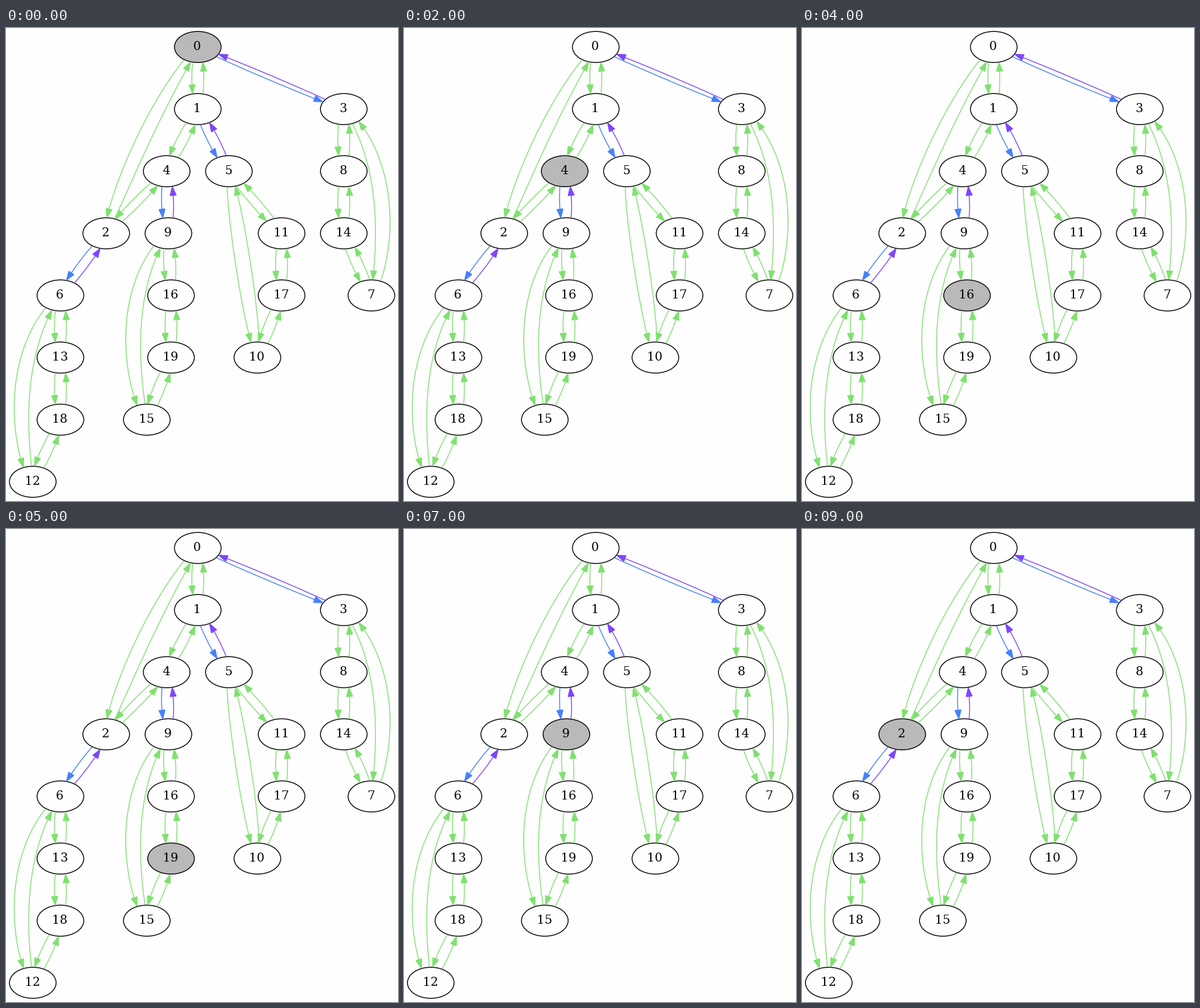
These frames come from a looping animation (605x731 px, 10 s). A matplotlib script:

```python
import numpy as np
import matplotlib.pyplot as plt
from matplotlib.animation import FuncAnimation
from matplotlib.patches import Ellipse, Polygon

W, H, DPI = 605, 731, 64
PT = 72 / DPI  # points per pixel
LINE = 4 / 3 * PT
RX, RY, ROW = 36, 24, 96
GREEN, BLUE, PURPLE = "#80e070", "#4680fa", "#7d46fa"
PAPER, VISITED = "#fefefe", "#b9b9b9"
HEAD_LEN, HEAD_HALF, DIGIT = 13.33, 4.67, 12

# x of every node, one dict per row
ROWS = [
    {0: 296},
    {1: 296, 3: 521.33},
    {4: 248, 5: 344, 8: 521.33},
    {2: 154.67, 9: 250.67, 11: 425.33, 14: 521.33},
    {6: 84, 16: 254.67, 17: 425.33, 7: 564},
    {13: 84, 19: 254.67, 10: 388},
    {18: 84, 15: 217.33},
    {12: 41.33},
]
NODES = {n: np.array([x, RY + 5.33 + ROW * r])
         for r, row in enumerate(ROWS) for n, x in row.items()}

# each ring of nodes, with the sideways bend of its closing link
RINGS = [((0, 1, 4, 2), -14), ((3, 8, 14, 7), 37), ((5, 11, 17, 10), 0),
         ((9, 16, 19, 15), -37), ((6, 13, 18, 12), -37)]
BRIDGES = [(0, 3), (1, 5), (4, 9), (2, 6)]
WALK = [0, 1, 4, 9, 16, 19, 15, 9, 4, 2]


def outside(points, center):
    x, y = (points - center).T
    return (x / (RX + 0.5))**2 + (y / (RY + 0.5))**2 > 1


def draw_arrow(ax, curve, color):
    tip = curve[-1]
    shaft = curve[np.hypot(*(curve - tip).T) >= HEAD_LEN]
    base = shaft[-1]
    along = (tip - base) / np.hypot(*(tip - base))
    side = HEAD_HALF * np.array([-along[1], along[0]])
    ax.plot(*shaft.T, color=color, lw=LINE, solid_capstyle="butt", snap=False)
    ax.add_patch(Polygon([base + side, tip, base - side], facecolor=color,
                         edgecolor=color, lw=LINE, joinstyle="miter"))


def draw_link(ax, top, bottom, down=GREEN, up=GREEN, bend=0):
    """A pair of opposite arrows, the downward one on the left."""
    a, b = NODES[top], NODES[bottom]
    gap = 8 + 1.2 * (b[1] - a[1]) / ROW
    u = np.linspace(0, 1, 800)
    arch = 4 * u * (1 - u)
    for side, color in ((-1, down), (1, up)):
        curve = a + (b - a) * u[:, None]
        curve[:, 0] += side * gap * arch**0.5 + bend * arch**0.8 * (1.2 - 0.4 * u)
        curve = curve[outside(curve, a) & outside(curve, b)]
        draw_arrow(ax, curve[::-side], color)


def draw_node(ax, node):
    x, y = NODES[node]
    oval = Ellipse((x, y), 2 * RX, 2 * RY, facecolor=PAPER, edgecolor="black", lw=LINE)
    ax.add_patch(oval)
    label = str(node)
    left = x - 0.9 - DIGIT * (len(label) - 1) / 2
    for i, digit in enumerate(label):
        ax.text(left + DIGIT * i, y + 4.9, digit, family="DejaVu Serif",
                size=14 * LINE, ha="center", va="baseline", color="black")
    return oval


fig = plt.figure(figsize=(W / DPI, H / DPI), dpi=DPI, facecolor=PAPER)
ax = fig.add_axes([0, 0, 1, 1])
ax.set_xlim(0, W)
ax.set_ylim(H, 0)
ax.axis("off")

ovals = {node: draw_node(ax, node) for node in NODES}
for ring, bend in RINGS:
    for top, bottom in zip(ring, ring[1:]):
        draw_link(ax, top, bottom)
    draw_link(ax, ring[0], ring[-1], bend=bend)
for top, bottom in BRIDGES:
    draw_link(ax, top, bottom, BLUE, PURPLE)


def update(step):
    for node, oval in ovals.items():
        oval.set_facecolor(VISITED if node == WALK[step] else PAPER)
    return list(ovals.values())


anim = FuncAnimation(fig, update, frames=len(WALK), interval=1000,
                     init_func=lambda: update(0), repeat=True, repeat_delay=0)
plt.show()
```
